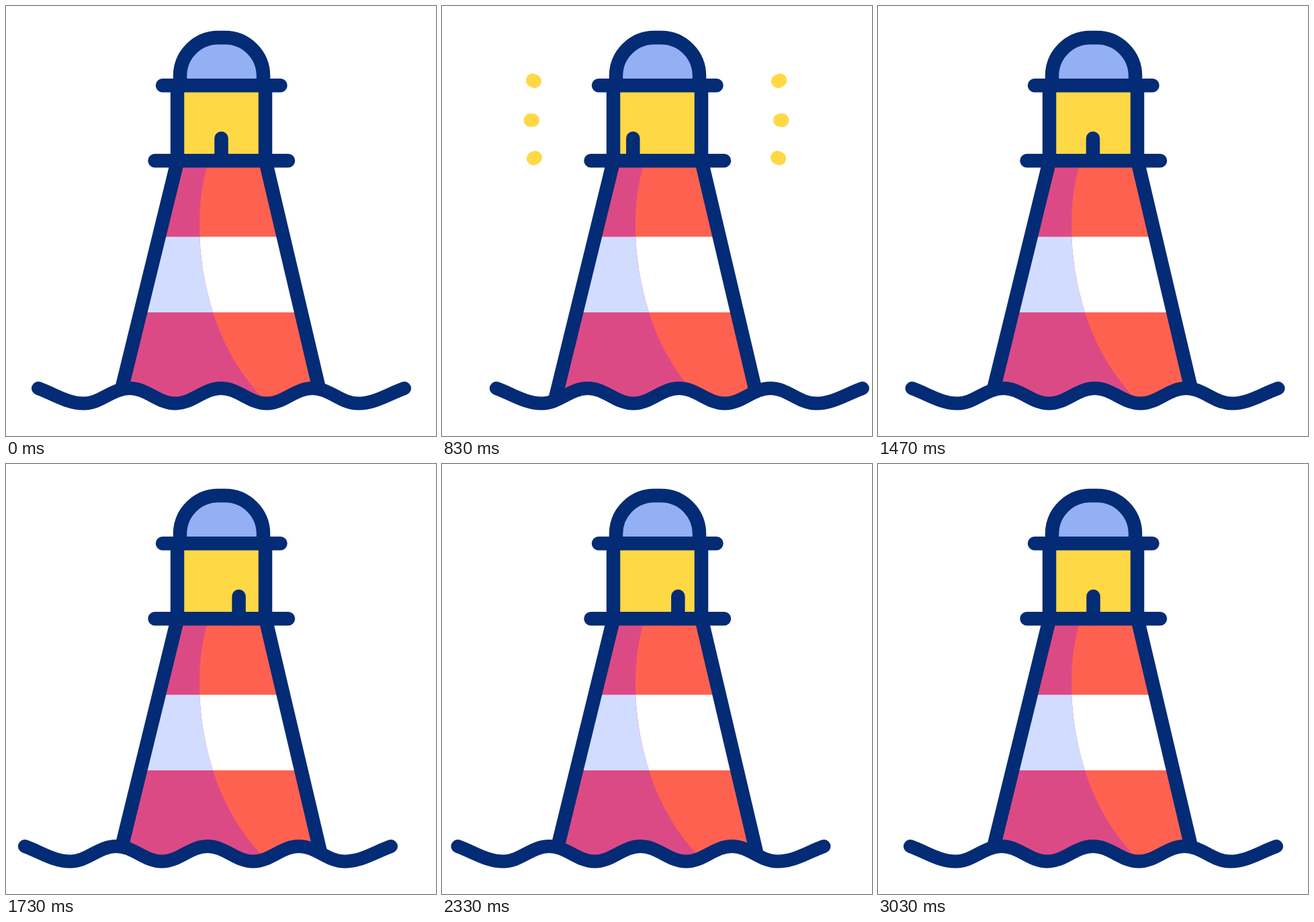
These frames come from a looping animation (640x640 px, 3170 ms). An HTML page:

```html
<!DOCTYPE html>
<html lang="en">
<head>
<meta charset="utf-8">
<title>Lighthouse</title>
<style>
  html, body { margin: 0; width: 100%; height: 100%; overflow: hidden; background: #fff; }
  svg { display: block; width: 100vw; height: 100vh; }
  .line { fill: none; stroke: #042b75; stroke-width: 20.5; stroke-linecap: round; }
  .ray { stroke: #ffd845; stroke-width: 20; stroke-linecap: round; }
</style>
</head>
<body>
<svg viewBox="0 0 640 640">
  <defs>
    <clipPath id="aboveWater"><path id="air"/></clipPath>
    <clipPath id="body"><path d="M253 235 H387.5 L470 590 H167Z"/></clipPath>
    <clipPath id="shade">
      <path d="M100 240 H299 C291 268 288 297 288 327 C288 372 295 415 308 456 C321 497 341 535 366 565 L387 591 H100Z"/>
    </clipPath>
  </defs>

  <g clip-path="url(#aboveWater)">
    <g clip-path="url(#body)">
      <path fill="#ff6150" d="M100 235 H540 V600 H100Z"/>
      <path fill="#fff" d="M100 343.5 H540 V456 H100Z"/>
      <g clip-path="url(#shade)">
        <path fill="#dc4a86" d="M100 235 H540 V600 H100Z"/>
        <path fill="#d2dcff" d="M100 343.5 H540 V456 H100Z"/>
      </g>
    </g>
    <path class="line" d="M254.2 235 L165 599 M387.3 235 L473 599"/>
  </g>

  <path fill="#ffd845" d="M255 118 H386 V230 H255Z"/>
  <path id="door" class="line" d="M320.5 197 V230"/>
  <path fill="#93b0f4" class="line" style="fill:#93b0f4"
        d="M259 118 V104 A57 57 0 0 1 316 47 H326 A57 57 0 0 1 383 104 V118"/>
  <path class="line" d="M255 118 V230 M386 118 V230 M233 118.3 H408.5 M221.5 230.2 H420"/>
  <path id="wave" class="line" style="stroke-width:20"/>
  <g id="rays"></g>
</svg>
<script>
const LOOP = 3170;
const $ = id => document.getElementById(id);

// Time, water shift and door shift at each turning point.
const SWAY = [
  [30, 0, 0],
  [940, 34, -37.5],
  [2030, -31.5, 39.5],
  [3000, 0, 0]
];

// Ray inner end and outer end on the left side; the right side is mirrored.
const RAYS = [
  [138, 112, 46, 71.5],
  [135, 170, 34.3, 170],
  [139, 225.5, 46.8, 267]
];
const FLASHES = [797, 1877];
const DRAW = 306, ERASE_AT = 195, ERASE = 165;

const clamp = u => Math.min(1, Math.max(0, u));
const sine = u => (1 - Math.cos(Math.PI * u)) / 2;
const smooth = u => u * u * (3 - 2 * u);
const mix = (a, b, u) => a + (b - a) * u;

function buildWave() {
  let d = 'M48 569 C73 578 91 591.5 116 591.5';
  for (let i = 1; i < 7; i++) {
    const x = 116 + 68 * i, y = i % 2 ? 569 : 591.5;
    d += ` S${x - 26} ${y} ${x} ${y}`;
  }
  d += ' C549 591.5 568 578 593 569';
  $('wave').setAttribute('d', d);
  $('air').setAttribute('d', d + ' V-20 H48Z');
}

function addRay([x1, y1, x2, y2], flip) {
  const el = document.createElementNS('http://www.w3.org/2000/svg', 'line');
  const side = x => flip ? 638 - x : x;
  el.setAttribute('class', 'ray');
  $('rays').append(el);
  return (tail, head) => {
    el.setAttribute('x1', mix(side(x1), side(x2), tail));
    el.setAttribute('y1', mix(y1, y2, tail));
    el.setAttribute('x2', mix(side(x1), side(x2), head));
    el.setAttribute('y2', mix(y1, y2, head));
  };
}

function sway(t, col) {
  for (let i = 1; i < SWAY.length; i++) {
    const a = SWAY[i - 1], b = SWAY[i];
    if (t < b[0]) return mix(a[col], b[col], sine(clamp((t - a[0]) / (b[0] - a[0]))));
  }
  return 0;
}

buildWave();
const rays = [false, true].flatMap(flip => RAYS.map(r => addRay(r, flip)));

function frame() {
  const t = performance.now() % LOOP;
  const water = `translate(${sway(t, 1)} 0)`;
  $('wave').setAttribute('transform', water);
  $('air').setAttribute('transform', water);
  $('door').setAttribute('transform', `translate(${sway(t, 2)} 0)`);

  const start = FLASHES.find(s => t > s && t < s + ERASE_AT + ERASE);
  $('rays').setAttribute('visibility', start ? 'visible' : 'hidden');
  if (start) {
    const head = smooth(clamp((t - start) / DRAW));
    const tail = smooth(clamp((t - start - ERASE_AT) / ERASE));
    rays.forEach(draw => draw(tail, head));
  }
  requestAnimationFrame(frame);
}
frame();
</script>
</body>
</html>
```
